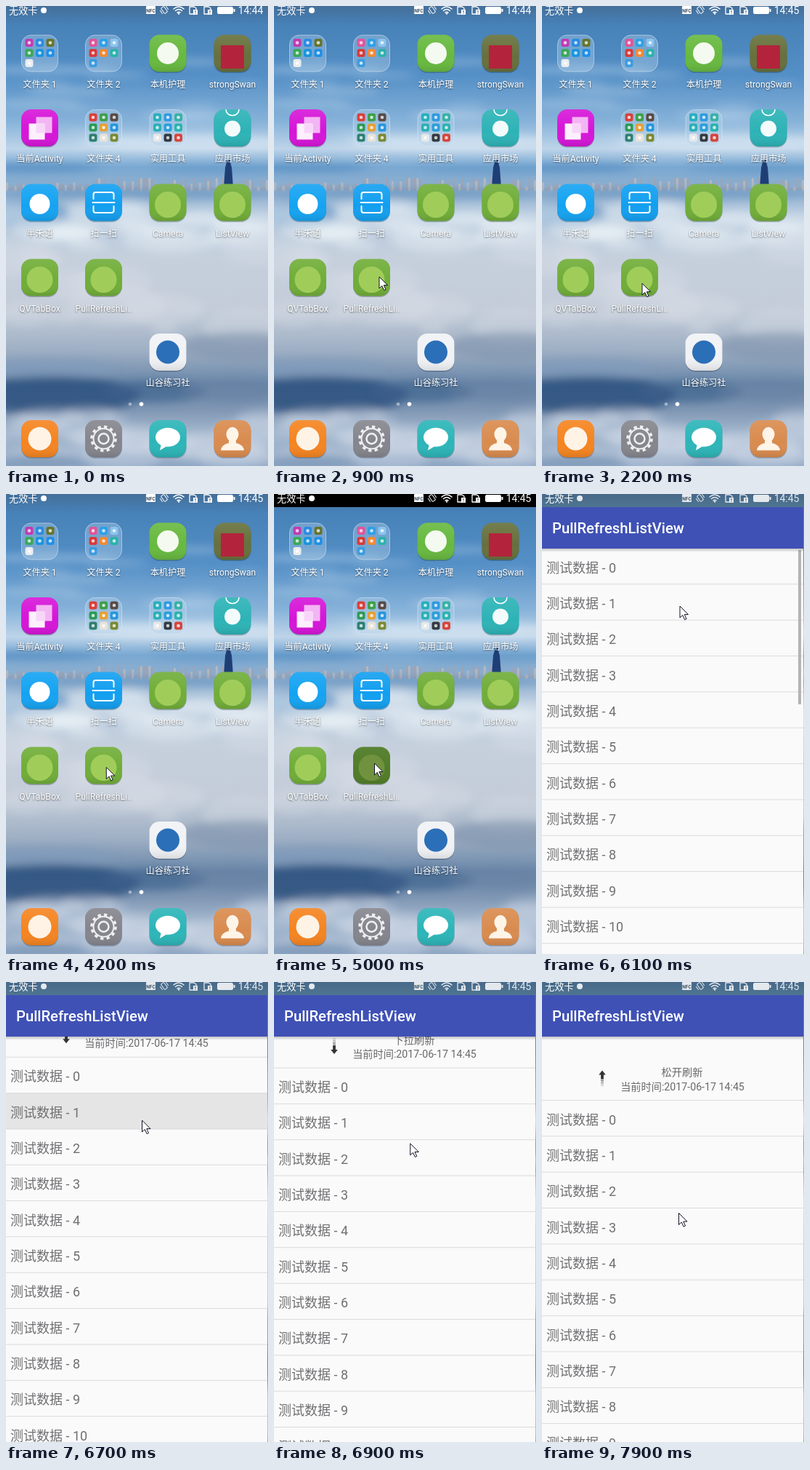
These frames come from a looping animation (361x632 px, 8000 ms). An HTML page:

```html
<!DOCTYPE html>
<html lang="zh-CN">
<head>
<meta charset="utf-8">
<title>PullRefreshListView</title>
<style>
html, body { margin: 0; width: 100%; height: 100%; overflow: hidden; background: #4b7fb0; }
svg { display: block; width: 361px; height: 632px; }
text { font-family: Roboto, "Noto Sans CJK SC", "Noto Sans CJK", sans-serif; white-space: pre; }
#labels { fill: #fff; font-size: 12.2px; text-anchor: middle; filter: drop-shadow(0 1px 1px rgba(0,0,0,.55)); }
#rows text { font-size: 18px; fill: #707072; }
#header text { font-size: 14.2px; fill: #69696b; text-anchor: middle; }
</style>
</head>
<body>
<svg id="stage" viewBox="0 0 361 632" xmlns="http://www.w3.org/2000/svg"></svg>
<script>
const CYCLE = 8000, STEP = 100, PITCH = 49.35;
const COLS = [46.5, 134.5, 223, 312], ROWS = [65, 167.5, 270, 373, 475.5, 594.5];

let seed = 7;
const rnd = () => (seed = (seed * 16807) % 2147483647) / 2147483647;
const repeat = (n, f) => Array.from({ length: n }, (_, i) => f(i)).join('');
const rect = (x, y, w, h, fill, more = '') =>
  `<rect x="${x}" y="${y}" width="${w}" height="${h}" fill="${fill}" ${more}/>`;
const disc = (x, y, r, fill, more = '') => `<circle cx="${x}" cy="${y}" r="${r}" fill="${fill}" ${more}/>`;
const text = (x, y, s, more = '') => `<text x="${x}" y="${y}" ${more}>${s}</text>`;
const path = (d, more) => `<path d="${d}" ${more}/>`;
const line = (d, w = 1, color = '#fff') =>
  path(d, `fill="none" stroke="${color}" stroke-width="${w}" stroke-linecap="round" stroke-linejoin="round"`);
const grad = (id, stops) => `<linearGradient id="${id}" x2="0" y2="1">` +
  stops.map(([o, c, a = 1]) => `<stop offset="${o}" stop-color="${c}" stop-opacity="${a}"/>`).join('') +
  '</linearGradient>';

// Wallpaper: sky, hazy skyline, sea of clouds
const blob = (x, y, rx, ry, fill, a) =>
  `<ellipse cx="${x}" cy="${y}" rx="${rx}" ry="${ry}" fill="${fill}" opacity="${a}"/>`;
const scatter = (n, y0, y1, fill, a, flat) => repeat(n, () => {
  const rx = 18 + rnd() * 50;
  return blob(rnd() * 361, y0 + rnd() * (y1 - y0), rx, rx * flat, fill, a);
});
const wallpaper = () => rect(0, 0, 361, 632, 'url(#sky)') +
  '<g filter="url(#soft)">' +
  scatter(16, 70, 195, '#d3e4f4', .28, .1) +
  blob(60, 88, 90, 6, '#c3dbf0', .4) + blob(250, 188, 150, 12, '#e3edf6', .5) +
  blob(40, 222, 90, 6, '#4c86bd', .6) + blob(300, 224, 100, 5, '#568fc4', .5) +
  '</g>' +
  repeat(95, i => {
    const h = 4 + rnd() * (i > 28 ? 15 : 8);
    return rect((i * 3.85).toFixed(1), (254 - h).toFixed(1), 3, h.toFixed(1), i % 3 ? '#a9a2ac' : '#d6c0b4', 'opacity=".6"');
  }) +
  path('M299 262L302 222 305 211H308L311 222 314 262Z', 'fill="#1e3f76"') +
  '<g filter="url(#soft)">' +
  blob(180, 258, 220, 7, '#4d82b5', .5) + blob(30, 285, 60, 18, '#5f93c4', .6) +
  scatter(18, 268, 330, '#eaf0f6', .42, .25) + scatter(12, 330, 450, '#d9e0e9', .35, .4) +
  blob(330, 468, 90, 20, '#7f93ac', .6) + blob(60, 498, 90, 14, '#7f9cbd', .6) +
  blob(65, 535, 120, 26, '#274d7b', .8) + blob(205, 530, 70, 15, '#3d618d', .65) +
  blob(310, 530, 70, 14, '#64809f', .5) +
  scatter(16, 562, 630, '#d4deeb', .38, .3) + blob(50, 628, 70, 12, '#5f80a8', .5) +
  '</g>';

// Home screen icons
const labels = [];
function icon(col, row, fill, art, label) {
  const x = COLS[col], y = ROWS[row];
  if (label) labels.push(text(x, y + 46.5, label));
  return `<g transform="translate(${x} ${y})">` +
    rect(-25.5, -24, 51, 51, '#123', 'rx="14" opacity=".28"') +
    rect(-25.5, -25.5, 51, 51, fill, 'rx="14"') +
    rect(-25.5, -25.5, 51, 51, 'url(#gloss)', 'rx="14"') + art + '</g>';
}
function folder(col, row, colors, label) {
  const x = COLS[col], y = ROWS[row];
  labels.push(text(x, y + 46.5, label));
  return `<g transform="translate(${x} ${y})">` +
    rect(-25, -25, 50, 50, '#b6d2ea', 'rx="13" fill-opacity=".38" stroke="#dcebf7" stroke-opacity=".55"') +
    colors.split(' ').map((c, i) => {
      const mx = -20 + i % 3 * 14.5, my = -20 + (i / 3 | 0) * 14;
      return rect(mx, my, 11, 11, '#' + c, 'rx="3"') + disc(mx + 5.5, my + 5.5, 2.3, '#fff', 'opacity=".75"');
    }).join('') + '</g>';
}
const green = (col, row, label) => icon(col, row, '#70ad38', disc(0, 3, 18, '#a0cd5a'), label);

const icons = () =>
  folder(0, 0, 'c13bb5 2c8be0 66752d 3aa85a 1b95dd 1f8fe8 e9edf0', '文件夹 1') +
  folder(1, 0, 'e0559a 2f9fe6 8ac4ee d83a3a ee8a3a 2bb3a9 3c9be0', '文件夹 2') +
  icon(2, 0, '#67b93f', disc(0, 0, 15, '#f4faf0'), '本机护理') +
  icon(3, 0, '#66703b', rect(-16, -11, 32, 32, '#b3243c'), 'strongSwan') +
  icon(0, 1, '#d615d8', rect(-5, -15, 22, 22, '#f3b5f4') + rect(-15, -6, 22, 22, '#fdeffd') +
    rect(-5, -6, 12, 13, '#f8d6f9'), '当前Activity') +
  folder(1, 1, 'd9403a 3f9f4b 5a4a45 2c9a57 e2a23a 2796dd 2f7f72 e8e3da 7b8a34', '文件夹 4') +
  folder(2, 1, '27aebc 2f9be0 35b2a6 2bb0b8 2b9fdc 2ab4b0 e6e8ea 333a40 d8453c', '实用工具') +
  icon(3, 1, '#2cb3b6', line('M-9-25A9 8 0 0 0 9-25', 1.5) + disc(0, 1, 11, '#f3fbfb'), '应用市场') +
  icon(0, 2, '#14a3f2', disc(0, 2, 14, '#fff'), '半禾语') +
  icon(1, 2, '#129ff0', line('M-14-5V-11Q-14-14-11-14H11Q14-14 14-11V-5M-14 5V11Q-14 14-11 14H11Q14 14 14 11V5M-15 0H15', 2), '扫一扫') +
  green(2, 2, 'Camera') + green(3, 2, 'ListView') +
  green(0, 3, 'QVTabBox') + green(1, 3, 'PullRefreshLi..') +
  icon(2, 4, '#f1f2f5', disc(0, 0, 16, '#2b6fb8'), '山谷练习社') +
  icon(0, 5, '#f58420', disc(0, 0, 16, '#fff3e6')) +
  icon(1, 5, '#85858d', disc(0, 0, 14, 'none', 'stroke="#f0f0f2" stroke-width="2"') +
    disc(0, 0, 16.5, 'none', 'stroke="#f0f0f2" stroke-width="3.5" stroke-dasharray="4.3 4.34"') +
    disc(0, 0, 7, 'none', 'stroke="#f0f0f2" stroke-width="2.5"')) +
  icon(2, 5, '#2cb5b8', blob(0, -2, 17, 13, '#fff', 1) + path('M-9 7L-11 16-1 10Z', 'fill="#fff"')) +
  icon(3, 5, '#d98b4e', blob(0, -6, 8.5, 10, '#fff4e8', 1) +
    path('M-16 16Q-15 8-5 6V2H5V6Q15 8 16 16Z', 'fill="#fff4e8"')) +
  disc(171, 547, 2.3, '#fff', 'opacity=".45"') + disc(186.5, 547, 2.8, '#fff');

const sim = x => line(`M${x} 1H${x + 6}L${x + 9} 3V11H${x}Z`, 1.3) + rect(x + 5, 5, 6, 7, '#fff') +
  rect(x + 7.5, 6, 1, 3, '#456') + rect(x + 7.5, 10, 1, 1, '#456');
const statusBar = () =>
  text(4, 10.8, '无效卡', 'font-size="13.2" fill="#fff"') +
  '<g id="tray">' + disc(52, 6, 4, '#fff') +
  rect(193, 0, 13, 11, '#fff', 'rx="1"') + text(199.5, 8.6, 'NFC', 'font-size="6.5" font-weight="700" fill="#456" text-anchor="middle"') +
  '<g transform="rotate(-35 218 5.5)">' + rect(215.5, 1, 5, 9, 'none', 'stroke="#fff" rx="1"') +
  line('M213 3V8M223 3V8') + '</g>' +
  line('M231 4Q238-2 245 4M233.5 6.5Q238 2.5 242.5 6.5M236 9Q238 7.5 240 9', 1.5) + disc(238, 10.5, 1.2, '#fff') +
  sim(253) + sim(273) +
  rect(291.5, 1.5, 21, 9, '#fff', 'rx="1.5" stroke="#fff"') + rect(313.5, 4, 2, 4, '#fff') +
  text(354.5, 11, '14:44', 'id="clock" font-size="14" fill="#fff" text-anchor="end"') + '</g>';

const arrow = () => path('M0-11L4.8-5H1.9V1H-1.9V-5H-4.8Z', 'fill="#333336"') +
  repeat(4, i => rect(-1.9, 2 + i * 2.4, 3.8, 1.4, '#333336', `opacity="${.7 - i * .16}"`));

const app = () =>
  '<g id="app">' + rect(0, 18, 360, 614, '#fafafb') +
  '<g id="list">' +
  rect(0, 75 + PITCH, 360, PITCH, '#e5e5e6', 'id="pressed"') +
  '<g id="rows">' + repeat(13, i => rect(0, 74 + i * PITCH, 360, 1, '#dbdbdd') +
    text(6, 107.5 + i * PITCH, '测试数据 - ' + i)) + '</g>' +
  '<g id="header" transform="translate(0 -88)"><g transform="translate(83 132.5)"><g id="arrow">' + arrow() + '</g></g>' +
  text(193, 129, '下拉刷新', 'id="hint"') + text(193.5, 148.5, '当前时间:2017-06-17 14:45') + '</g></g>' +
  rect(353, 77, 4, 212, '#b4b4b6', 'id="thumb"') +
  rect(0, 75, 360, 5, 'url(#shade)') + rect(0, 18, 360, 57, '#3f51b5') +
  text(14, 54, 'PullRefreshListView', 'font-size="20.2" font-weight="500" fill="#fff"') + '</g>';

const tiles = icons();
document.getElementById('stage').innerHTML =
  '<defs><filter id="soft" filterUnits="userSpaceOnUse" x="-60" y="0" width="480" height="660"><feGaussianBlur stdDeviation="6"/></filter>' +
  grad('sky', [[0, '#456f99'], [.04, '#4681b8'], [.15, '#548fc6'], [.25, '#86b2d9'], [.31, '#bdd4e9'], [.35, '#79a8d2'],
    [.39, '#8fb0d0'], [.45, '#b3c8dd'], [.55, '#c6d0dd'], [.66, '#c3ccd8'], [.75, '#9eafc4'], [.82, '#6a87a9'],
    [.88, '#8198b5'], [.93, '#a6b9cf'], [1, '#8ea6c3']]) +
  grad('gloss', [[0, '#fff', .1], [.6, '#fff', 0], [1, '#000', .1]]) +
  grad('shade', [[0, '#000', .22], [1, '#000', 0]]) +
  grad('bar', [[0, '#48698a'], [1, '#4f7590']]) + '</defs>' +
  wallpaper() + tiles + `<g id="labels">${labels.join('')}</g>` +
  rect(109, 347.5, 51, 51, '#1c2a10', 'id="tap" rx="14" opacity=".36"') +
  rect(0, 0, 0, 0, '#fafafc', 'id="splash"') + app() +
  rect(0, 0, 361, 18, '#000', 'id="bar"') + statusBar() +
  '<g id="cursor">' + path('M0 0V16L3.8 12.5 6.6 18.6 9 17.5 6.3 11.6H11.5Z', 'fill="#fff" stroke="#111122" stroke-linejoin="round"') + '</g>';

const ui = {};
document.querySelectorAll('#stage [id]').forEach(e => ui[e.id] = e);
const set = (name, attrs) => Object.entries(attrs).forEach(([k, v]) => ui[name].setAttribute(k, v));
const show = (name, on) => ui[name].style.display = on ? '' : 'none';

// Keys: time, then one or more values
const POINTER = [[200, 348, 76], [400, 286, 165], [700, 186, 312], [900, 145, 372], [1000, 138, 381], [4100, 138, 381],
  [4300, 138.5, 370], [5300, 138.5, 370], [5500, 156, 300], [5700, 182, 195], [5900, 190, 158], [6100, 190, 154],
  [6300, 189, 143], [6700, 187.5, 190], [7500, 188.5, 317.5]];
const PULL = [[6300, 0], [6700, 28.7], [7500, 88]];
const TURN = [[7000, 180], [7200, 0]];
const THUMB = [[6200, 1], [6500, 0]];
function at(keys, t) {
  const i = keys.findIndex(k => k[0] > t);
  if (i < 0) return keys[keys.length - 1].slice(1);
  if (i === 0) return keys[0].slice(1);
  const a = keys[i - 1], b = keys[i], f = (t - a[0]) / (b[0] - a[0]);
  return a.slice(1).map((v, n) => v + (b[n + 1] - v) * f);
}
const SPLASH = { 5100: [29, 125, 274, 447], 5200: [0, 25, 356, 607] };

function draw(t) {
  const pull = at(PULL, t)[0], open = t >= 5100, box = SPLASH[t];
  show('cursor', t >= 200);
  set('cursor', { transform: `translate(${at(POINTER, t).join(' ')})` });
  ui.clock.textContent = t < 2200 ? '14:44' : '14:45';

  show('tap', t >= 4800 && t < 5200);
  show('bar', t >= 5000);
  set('bar', { fill: open ? 'url(#bar)' : '#000' });
  set('tray', { opacity: open ? .85 : 1 });
  show('splash', box);
  if (box) set('splash', { x: box[0], y: box[1], width: box[2], height: box[3] });

  show('app', t >= 5300);
  show('list', t >= 5400);
  show('pressed', t >= 6400 && t < 6900);
  set('list', { transform: `translate(0 ${pull})` });
  set('thumb', { opacity: t < 5400 ? 0 : at(THUMB, t)[0] });
  set('arrow', { transform: `rotate(${at(TURN, t)[0]})` });
  ui.hint.textContent = pull > 58 ? '松开刷新' : '下拉刷新';
}

const start = performance.now();
function tick() {
  const t = (performance.now() - start) % CYCLE;
  draw(Math.floor(t / STEP) * STEP);
  requestAnimationFrame(tick);
}
tick();
</script>
</body>
</html>
```
